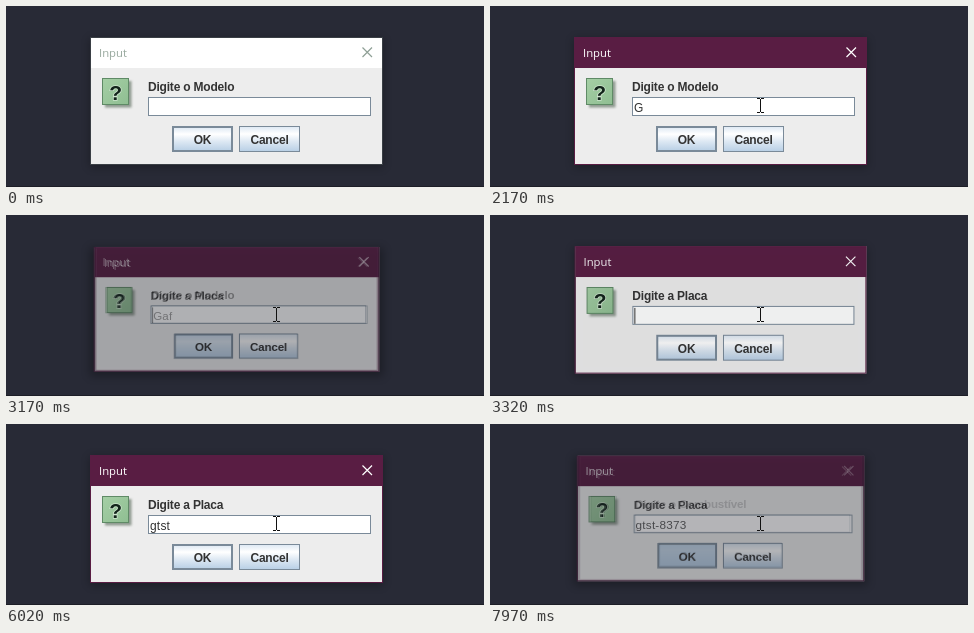
Animation of 478 by 181 pixels, one loop 8 s. Source, as an HTML page:

```html
<!DOCTYPE html>
<html lang="pt">
<head>
<meta charset="utf-8">
<title>Input dialog</title>
<style>
  html, body { margin: 0; width: 100%; height: 100%; overflow: hidden; background: #282a36; }
  svg { display: block; width: 478px; height: 181px; }
  text { font-family: "Liberation Sans", Arial, sans-serif; font-size: 12px; fill: #333; }
  .bold { font-weight: 700; letter-spacing: -0.2px; }
  .field { letter-spacing: 0.2px; }
  .title { font-family: "Open Sans", "Noto Sans", sans-serif; font-size: 11.3px; }
  .mark { font-size: 21px; font-weight: 700; fill: #12241a; stroke: #cfe6cf; stroke-width: 1.6px; paint-order: stroke; }
</style>
</head>
<body>
<svg id="stage" viewBox="0 0 478 181" xmlns="http://www.w3.org/2000/svg">
  <defs>
    <linearGradient id="button" x2="0" y2="1">
      <stop offset="0" stop-color="#dde8f3"/>
      <stop offset=".3" stop-color="#fff"/>
      <stop offset=".6" stop-color="#dde8f3"/>
      <stop offset="1" stop-color="#b8cfe5"/>
    </linearGradient>
    <linearGradient id="icon" x2="1" y2="1">
      <stop offset="0" stop-color="#a5cfa5"/>
      <stop offset="1" stop-color="#8fbe92"/>
    </linearGradient>
    <filter id="soft" x="-20%" y="-20%" width="140%" height="140%"><feGaussianBlur stdDeviation="5"/></filter>
    <filter id="softIcon" x="-20%" y="-20%" width="140%" height="140%"><feGaussianBlur stdDeviation="1"/></filter>
  </defs>
  <rect width="478" height="181" fill="#282a36"/>
  <rect y="180" width="478" height="1" fill="#1d1e27"/>
  <rect x="84" y="33" width="293" height="128" filter="url(#soft)" opacity=".3"/>
  <g id="dialogs"></g>
  <g id="mouse">
    <circle id="halo" cx="-2" cy="-1" r="12" fill="#ff0" fill-opacity=".6"/>
    <path id="beam" d="M-3 -6.5H0M1 -6.5H4M.5 -6V7M-3 7.5H0M1 7.5H4" fill="none" stroke="#111"/>
    <path id="arrow" d="M0 0V14L3.3 11L5.6 16.2L7.8 15.2L5.5 10.2H10Z" fill="#fff" stroke="#111" stroke-width=".8"/>
  </g>
</svg>
<script>
const LOOP = 8000;
const CENTER = [230.5, 70];
const ACTIVE_AT = 460, HALO_END = 610;
const $ = id => document.getElementById(id);

const REFRESH = [0, 70, 150, 230, 310, 380, 460, 530, 610,
  3020, 3090, 3170, 3240, 3320, 3400, 7900, 7970];

// Each entry: time, typed text, caret visible.
const MODEL = [[0, '', 0], [460, '', 1], [990, '', 0], [1540, '', 1], [1710, 'G', 1],
  [2170, 'G', 0], [2250, 'Ga', 1], [2400, 'Gaf', 1], [2940, 'Gaf', 0]];
const PLATE = [[0, '', 0], [3170, '', 1], [3630, '', 0], [4090, '', 1], [4640, '', 0],
  [4790, 'g', 1], [5250, 'g', 0], [5330, 'gts', 1], [5560, 'gtst', 1], [6020, 'gtst', 0],
  [6100, 'gtst-', 1], [6480, 'gtst-8', 1], [6650, 'gtst-83', 1], [6950, 'gtst-837', 1],
  [7120, 'gtst-8373', 1], [7650, 'gtst-8373', 0]];

function button(name, x, w, label, border) {
  const h = border / 2;
  return `<rect class="${name}" x="${x + h}" y="${120 + h}" width="${w - border}" height="${26 - border}"
      fill="url(#button)" stroke="#7a8a99" stroke-width="${border}"/>
    <text class="bold" x="${x + w / 2}" y="138" text-anchor="middle">${label}</text>`;
}

function makeDialog(label, opens, closes, typing) {
  const g = document.createElementNS('http://www.w3.org/2000/svg', 'g');
  g.innerHTML = `
    <rect x="85" y="31" width="292" height="128" fill="#ededed"/>
    <rect class="bar" x="85" y="31" width="292" height="31"/>
    <rect class="edge" x="84.5" y="31.5" width="292" height="127" fill="none"/>
    <text class="title" x="93" y="51">Input</text>
    <path class="close" d="M356.5 41.5l9.5 9.5m0-9.5l-9.5 9.5" fill="none" stroke-width="1.2"/>
    <rect x="99" y="75" width="26.5" height="26.5" fill="#8f9a90" filter="url(#softIcon)"/>
    <rect x="96.5" y="72.5" width="26" height="26" fill="url(#icon)" stroke="#5f8a66"/>
    <text class="mark" x="109.7" y="93.5" text-anchor="middle">?</text>
    <text class="bold" x="142" y="85">${label}</text>
    <rect x="142.5" y="91.5" width="222" height="18" fill="#fff" stroke="#7a8a99"/>
    <text class="field" x="144" y="106"></text>
    <rect class="caret" y="93" width="1" height="16" fill="#333"/>
    ${button('ok', 166, 61, 'OK', 2)}${button('cancel', 233, 61, 'Cancel', 1)}`;
  $('dialogs').append(g);
  const part = name => g.querySelector('.' + name);
  return { g, opens, closes, typing, bar: part('bar'), edge: part('edge'), title: part('title'),
    close: part('close'), field: part('field'), caret: part('caret'), ok: part('ok') };
}

// A closing dialog stays above the one that opens.
const dialogs = [
  makeDialog('Digite o Combustível', 7885, Infinity, [[0, '', 0]]),
  makeDialog('Digite a Placa', 3005, 7885, PLATE),
  makeDialog('Digite o Modelo', -1000, 3005, MODEL)
];

const last = (list, test) => list.filter(test).pop();

function ramp(points, x) {
  for (let i = 1; i < points.length; i++) {
    const [x0, y0] = points[i - 1], [x1, y1] = points[i];
    if (x < x1) return x <= x0 ? y0 : y0 + (y1 - y0) * (x - x0) / (x1 - x0);
  }
  return points[points.length - 1][1];
}

const FADE_IN = [[0, 0], [85, .3], [165, .5], [315, .93], [395, 1]];
const FADE_OUT = [[0, 1], [85, .53], [165, .3], [240, 0]];

function smooth(p) {
  const q = Math.min(1, Math.max(0, p));
  return q * q * (3 - 2 * q);
}

function drawDialog(d, t, held) {
  const age = held - d.opens, gone = held - d.closes;
  const closing = gone > 0;
  const alpha = closing ? ramp(FADE_OUT, gone) : ramp(FADE_IN, age);
  const scale = closing ? 1 - gone * .00022 : .96 + .04 * smooth(age / 395);
  const [cx, cy] = CENTER;
  d.g.style.display = alpha > 0 ? '' : 'none';
  d.g.setAttribute('opacity', alpha);
  d.g.setAttribute('transform', `translate(${cx} ${cy}) scale(${scale}) translate(${-cx} ${-cy})`);

  const active = t >= ACTIVE_AT;
  d.bar.setAttribute('fill', active ? '#591d43' : '#fff');
  d.edge.setAttribute('stroke', active ? '#591d43' : '#3a3f45');
  d.title.style.fill = active ? '#fff' : '#97a89d';
  d.close.setAttribute('stroke', active ? '#fff' : '#8fa096');
  d.close.setAttribute('opacity', closing ? .4 : 1);
  d.ok.setAttribute('fill', closing ? '#b8cfe5' : 'url(#button)');

  const [, typed, caret] = last(d.typing, e => e[0] <= t);
  d.field.textContent = typed;
  const width = typed && alpha > 0 ? d.field.getComputedTextLength() : 0;
  d.caret.setAttribute('x', Math.floor(144.3 + width));
  d.caret.setAttribute('opacity', caret);
}

function drawMouse(t, held) {
  const p = Math.min(1, Math.max(0, (held - 70) / 390));
  const rest = (1 - p) ** 2;
  const x = 270 + 24 * rest, y = 99 + 62 * rest;
  const inField = y < 110;
  $('mouse').style.display = t < 70 ? 'none' : '';
  $('mouse').setAttribute('transform', `translate(${x} ${y})`);
  $('halo').style.display = t < HALO_END ? '' : 'none';
  $('beam').style.display = inField ? '' : 'none';
  $('arrow').style.display = inField ? 'none' : '';
}

function draw(t) {
  const held = last(REFRESH, r => r <= t);
  dialogs.forEach(d => drawDialog(d, t, held));
  drawMouse(t, held);
}

function tick() {
  draw(performance.now() % LOOP);
  requestAnimationFrame(tick);
}
tick();
</script>
</body>
</html>
```
